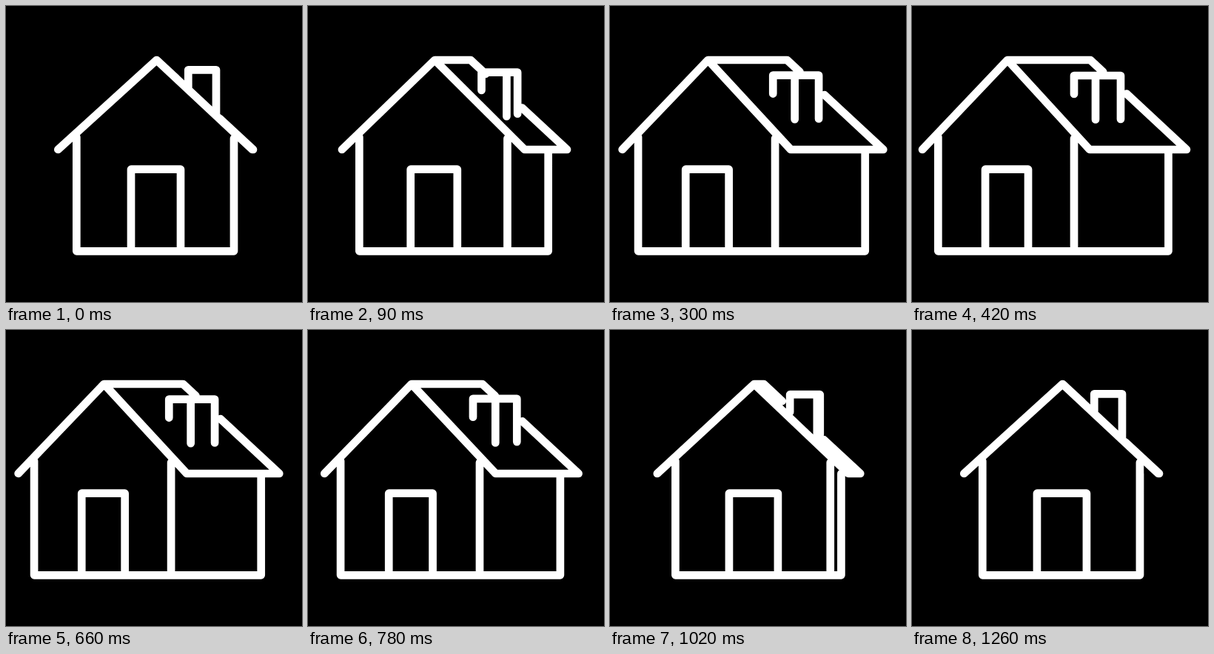
Animation, 400 px wide and 400 px high, one loop 1.29 s. Source, as an HTML page:

```html
<!DOCTYPE html>
<html lang="en">
<head>
<meta charset="utf-8">
<title>Turning house</title>
<style>
  html, body { margin: 0; height: 100%; overflow: hidden; background: #000; }
  svg { display: block; width: 100vw; height: 100vh; }
  path { fill: none; stroke: #fff; stroke-width: 10.7; stroke-linecap: round; stroke-linejoin: round; }
</style>
</head>
<body>
<svg viewBox="0 0 400 400"><path id="house"/></svg>
<script>
const LOOP = 1290, TURN = 430, STEP = 30;
const RIDGE = 73, EAVE = 194, GROUND = 331.3;
const house = document.getElementById('house');

// Cubic Bezier easing with flat ends: control points (x1, 0) and (x2, 1).
function ease(x, x1, x2) {
  let lo = 0, hi = 1;
  for (let i = 0; i < 24; i++) {
    const s = (lo + hi) / 2, r = 1 - s;
    if (3 * s * r * r * x1 + 3 * s * s * r * x2 + s ** 3 < x) lo = s;
    else hi = s;
  }
  return lo * lo * (3 - 2 * lo);
}

// 0 = front view, 1 = fully turned.
const turnAt = t => t < TURN
  ? ease(t / TURN, .2, .1)
  : 1 - ease((t - TURN) / (LOOP - TURN), .86, .265);

const line = (...points) => 'M' + points.join('L');

function outline(p) {
  const mix = (a, b) => a + (b - a) * p;
  const apex = [mix(203.5, 129), RIDGE];
  const frontEave = [mix(333, 240), EAVE];
  const ridgeEnd = [mix(203.5, 241), RIDGE];
  const backEave = [mix(334, 371), EAVE];
  const onBackSlope = y => [
    ridgeEnd[0] + (backEave[0] - ridgeEnd[0]) * (y - RIDGE) / (EAVE - RIDGE), y];

  const left = mix(95.3, 35.3), front = mix(308, 219), back = mix(308, 346.5);
  const doorLeft = mix(169, 99), doorRight = mix(236, 157), doorTop = 220.7;
  const stackLeft = mix(246.3, 219), stackMid = mix(284, 248), stackRight = mix(284, 282);
  const stackTop = mix(86.3, 94);

  return [
    line([mix(70.3, 14), EAVE], apex, frontEave, backEave),
    line(apex, ridgeEnd, onBackSlope(89 + 9 * (1 - p) ** 2)),
    line(onBackSlope(mix(152, 118.5)), backEave),
    line([left, 177], [left, GROUND], [back, GROUND], [back, EAVE]),
    line([front, 179], [front, GROUND]),
    line([doorLeft, GROUND], [doorLeft, doorTop], [doorRight, doorTop], [doorRight, GROUND]),
    line([stackLeft, mix(110, 119)], [stackLeft, stackTop],
         [stackRight, stackTop], [stackRight, mix(140, 153)]),
    line([stackMid, stackTop], [stackMid, mix(146, 153.5)])
  ].join('');
}

function draw() {
  const t = Math.floor(performance.now() % LOOP / STEP) * STEP;
  house.setAttribute('d', outline(turnAt(t)));
  requestAnimationFrame(draw);
}
draw();
</script>
</body>
</html>
```
